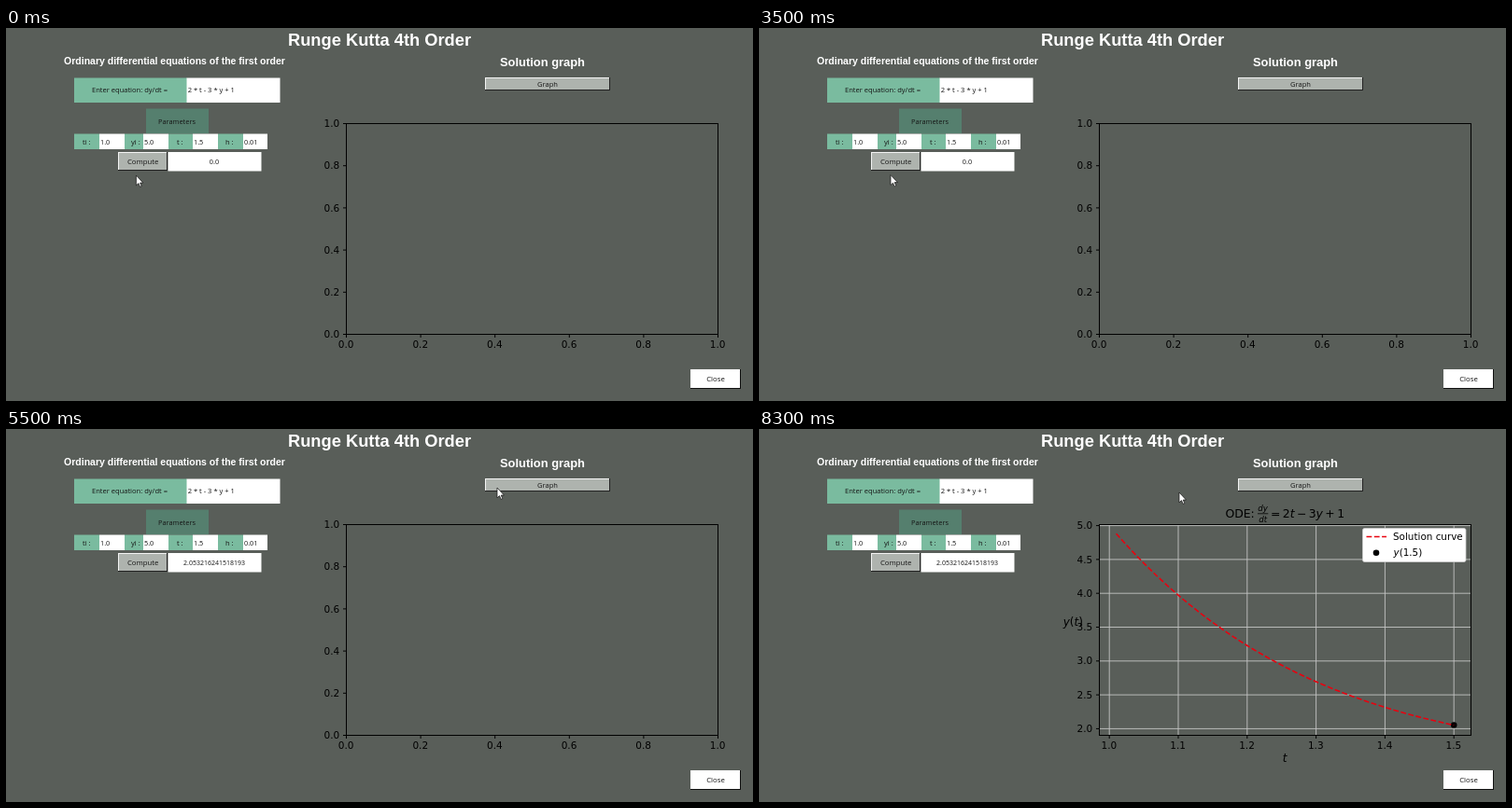
Animation, 800 px wide and 400 px high, one loop 8700 ms. Source, as an HTML page:

```html
<!DOCTYPE html>
<html lang="en">
<head>
<meta charset="utf-8">
<title>Runge Kutta 4th Order</title>
<style>
  html, body { margin: 0; width: 100%; height: 100%; overflow: hidden; background: #595e59; }
  svg { display: block; width: 800px; height: 400px; }
  text { white-space: pre; }
  .head { font-family: "Liberation Sans", Arial, sans-serif; font-weight: bold; fill: #fff; }
  .ui { font-family: "Open Sans", "Noto Sans", sans-serif; fill: #151515; }
  .plot { font-family: "DejaVu Sans", sans-serif; fill: #000; }
  .it { font-style: italic; }
</style>
</head>
<body>
<svg id="stage" viewBox="0 0 800 400"></svg>
<script>
const GREEN = '#7abb9f', GREY = '#aeb3ae', RED = '#e8000f';
const LOOP = 8700, STEP = 100;
const COMPUTED = 4300, PRESSED = 5700, PLOTTED = 7700;

const rect = (x, y, r, b, fill) =>
  `<rect x="${x}" y="${y}" width="${r - x}" height="${b - y}" fill="${fill}"/>`;
const line = (x1, y1, x2, y2, color = '#000', w = 1) =>
  `<path d="M${x1} ${y1}L${x2} ${y2}" stroke="${color}" stroke-width="${w}"/>`;
const text = (cls, x, y, size, str, anchor = 'start') =>
  `<text class="${cls}" x="${x}" y="${y}" font-size="${size}" text-anchor="${anchor}">${str}</text>`;
const ui = (x, y, str, anchor, size = 7.55) => text('ui', x, y, size, str, anchor);
const group = (id, body) => `<g id="${id}">${body}</g>`;
const it = (str, dx = 0) => `<tspan class="it" dx="${dx}">${str}</tspan>`;

// Button with a one pixel bevel: light is the top left edge, dark the bottom right one
function button(x, y, r, b, fill, light, dark) {
  return rect(x, y, r, b, dark) + rect(x, y, r - 1, b - 1, light) +
    rect(x + 1, y + 1, r - 1, b - 1, fill);
}

function form() {
  const cells = [
    [73, 100, 127, 82, 'ti :', '1.0'],
    [127, 147, 174, 134, 'yi :', '5.0'],
    [174, 200, 227, 183, 't :', '1.5'],
    [227, 254, 280, 235, 'h :', '0.01']
  ];
  return text('head', 400, 19, 18.3, 'Runge Kutta 4th Order', 'middle') +
    text('head', 180.5, 38.5, 10.5, 'Ordinary differential equations of the first order', 'middle') +
    text('head', 574.5, 40.7, 12.9, 'Solution graph', 'middle') +
    rect(73, 53.5, 194, 80, GREEN) + rect(193.5, 53.5, 293.5, 80, '#fff') +
    ui(92, 69, 'Enter equation: dy/dt =') + ui(194.7, 69, '2 * t - 3 * y + 1') +
    rect(150, 86.5, 217, 113, '#557f6e') + ui(183, 102.5, 'Parameters', 'middle', 7.4) +
    cells.map(([x, mid, end, tx, name, value]) =>
      rect(x, 113.5, mid, 130, GREEN) + rect(mid, 113.5, end, 130, '#fff') +
      ui(tx, 124.5, name) + ui(mid + 1, 124.5, value, 'start', 7.3)).join('') +
    button(120, 133, 173, 153, GREY, '#f4f4f4', '#222') +
    ui(146.7, 146, 'Compute', 'middle', 7.8) +
    rect(173.5, 133, 273.5, 153.5, '#fff') +
    group('zero', ui(223, 146, '0.0', 'middle', 7.3)) +
    group('result', ui(223, 146, '2.053216241518193', 'middle', 7)) +
    group('graphUp', button(513, 53, 647, 67, GREY, '#f4f4f4', '#222') +
      ui(580, 63.3, 'Graph', 'middle')) +
    group('graphDown', button(513, 53, 647, 67, '#fff', '#444', '#eee') +
      ui(580.8, 64, 'Graph', 'middle')) +
    button(733, 366, 787, 387, '#fff', '#fff', '#111') +
    ui(760, 379.3, 'Close', 'middle', 7.8);
}

const label = (x, y, v, anchor) => text('plot', x, y, 10.5, v.toFixed(1), anchor);
const xTick = (x, v) => line(x, 328.5, x, 332) + label(x - .3, 342.8, v, 'middle');
const yTick = (y, v) => line(361, y, 364.5, y) + label(357.3, y + 3.6, v, 'end');
const range = n => [...Array(n).keys()];

function emptyAxes() {
  return range(6).map(i =>
    xTick(364.5 + i * 79.6, i / 5) + yTick(328.5 - i * 45.2, i / 5)).join('');
}

const px = t => 375.2 + (t - 1) * 738;
const py = y => 321.4 - (y - 2) * 72.6;
// Exact solution of dy/dt = 2t - 3y + 1 with y(1) = 5
const solve = t => 2 * t / 3 + 1 / 9 + 38 / 9 * Math.exp(-3 * (t - 1));

function plot() {
  const grid = '#c3c5c3', dash = `fill="none" stroke="${RED}" stroke-width="1.6" stroke-dasharray="5.8 2.5"`;
  const curve = range(50).map(i => 1.01 + i / 100)
    .map(t => `${px(t).toFixed(2)} ${py(solve(t)).toFixed(2)}`).join('L');
  const size = 12.4, gap = 2.4;
  return range(6).map(i => {
      const x = px(1 + i / 10);
      return line(x, 102.5, x, 328.5, grid, .9) + xTick(x, 1 + i / 10);
    }).join('') +
    range(7).map(i => {
      const y = py(2 + i / 2);
      return line(364.5, y, 762.5, y, grid, .9) + yTick(y, 2 + i / 2);
    }).join('') +
    `<circle cx="${px(1.5)}" cy="${py(solve(1.5))}" r="3.3"/>` +
    `<path d="M${curve}" ${dash}/>` +
    text('plot', 499.5, 94.8, size, 'ODE:') +
    text('plot it', 539.6, 88, 8.6, 'dy', 'middle') +
    line(534, 90.8, 545.3, 90.8, '#000', .8) +
    text('plot it', 539.6, 100, 8.6, 'dt', 'middle') +
    text('plot', 548, 94.8, size, `=<tspan dx="${gap}">2</tspan>${it('t')}` +
      `<tspan dx="${gap}">−</tspan><tspan dx="${gap}">3</tspan>${it('y')}` +
      `<tspan dx="${gap}">+</tspan><tspan dx="${gap}">1</tspan>`) +
    text('plot', 325.7, 211.3, 12, `${it('y')}(${it('t')})`) +
    text('plot it', 563, 357.3, 12, 't', 'middle') +
    '<rect x="646.5" y="106.5" width="110.5" height="36" rx="2" fill="#fff" stroke="#ccc" stroke-width=".8"/>' +
    `<path d="M650.5 115.5H672" ${dash}/><circle cx="661" cy="132.7" r="3.3"/>` +
    text('plot', 679, 119.4, 10.4, 'Solution curve') +
    text('plot', 679.5, 136, 10.4, `${it('y')}(1.5)`);
}

const stage = document.getElementById('stage');
stage.innerHTML = rect(0, 0, 800, 400, '#595e59') + form() +
  group('empty', emptyAxes()) + group('solution', plot()) +
  '<rect x="364.5" y="102.5" width="398" height="226" fill="none" stroke="#000"/>' +
  '<path id="cursor" d="M0 0V10.8L2.5 8.6L4.1 12.3L5.8 11.6L4.2 8H7.4Z" fill="#fff" stroke="#111" stroke-width=".7"/>';

// Pointer: time, x, y
const path = [
  [0, 139.4, 158], [3400, 139.4, 158], [3500, 141, 157.6], [3800, 144, 152],
  [4100, 146, 147], [4600, 146, 147], [4700, 215, 142], [4800, 350, 126],
  [4900, 446.8, 111], [5000, 484, 95], [5200, 517, 74], [5500, 526, 63],
  [5700, 526, 63], [5800, 495, 66], [5900, 465, 68], [6000, 456, 68],
  [6100, 456, 68], [6500, 450, 68], [LOOP, 450, 68]
];

function pointAt(t) {
  const i = path.findIndex((p, k) => k && t <= p[0]);
  const [t0, x0, y0] = path[i - 1], [t1, x1, y1] = path[i];
  const k = (t - t0) / (t1 - t0);
  return [x0 + (x1 - x0) * k, y0 + (y1 - y0) * k];
}

const part = id => document.getElementById(id);
const parts = Object.fromEntries(
  ['zero', 'result', 'graphUp', 'graphDown', 'empty', 'solution', 'cursor'].map(id => [id, part(id)]));
const show = (id, on) => parts[id].setAttribute('visibility', on ? 'visible' : 'hidden');

function draw(now) {
  const t = Math.floor(now % LOOP / STEP) * STEP;
  const down = t >= PRESSED && t < PLOTTED;
  show('zero', t < COMPUTED);
  show('result', t >= COMPUTED);
  show('graphUp', !down);
  show('graphDown', down);
  show('empty', t < PLOTTED);
  show('solution', t >= PLOTTED);
  parts.cursor.setAttribute('transform', `translate(${pointAt(t)})`);
}

const start = performance.now();
function tick() {
  draw(performance.now() - start);
  requestAnimationFrame(tick);
}
tick();
</script>
</body>
</html>
```
